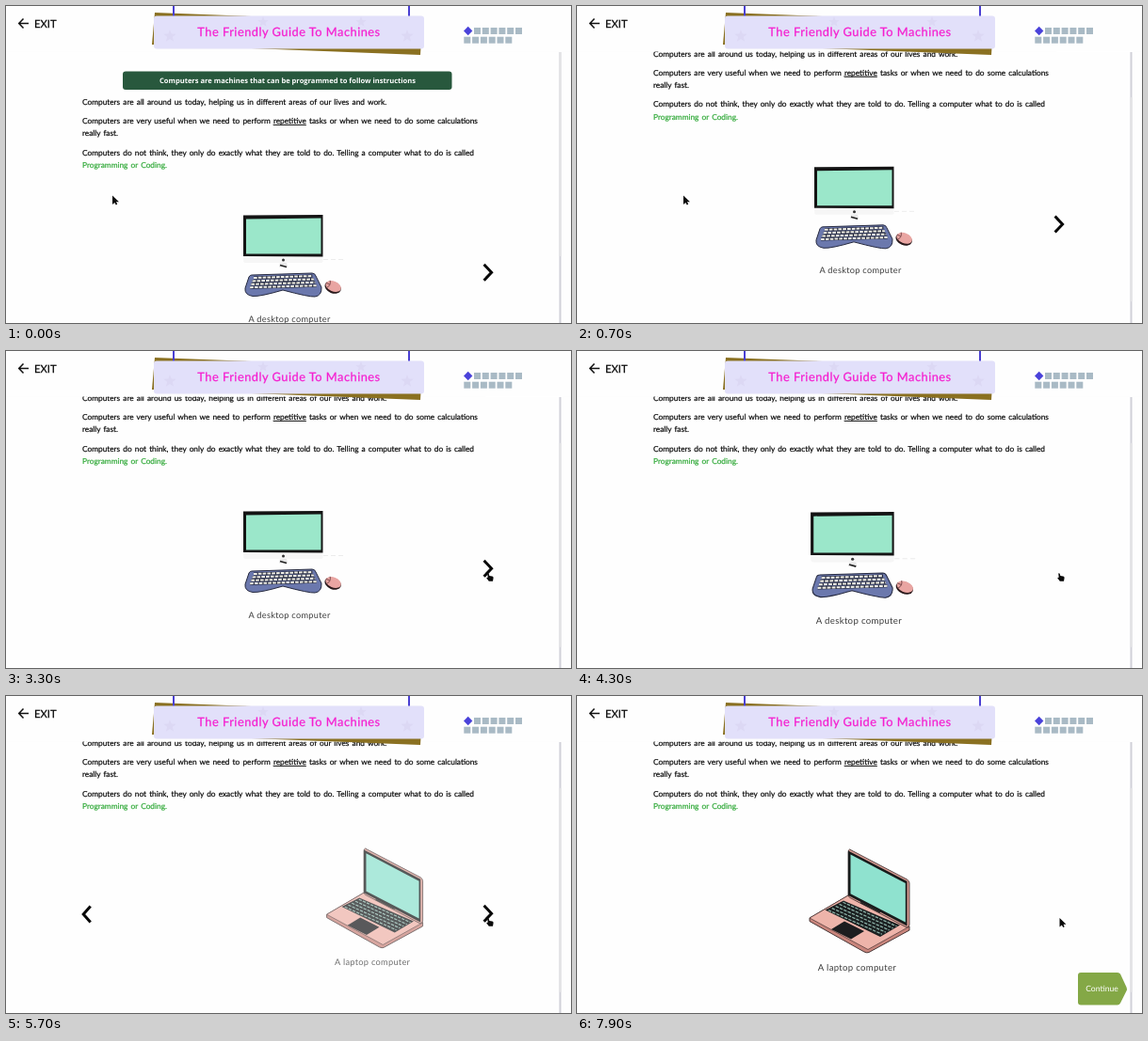
These frames come from a looping animation (600 px wide and 337 px high, 8000 ms). An HTML page:

```html
<!DOCTYPE html>
<html lang="en">
<head>
<meta charset="utf-8">
<title>Lesson slide</title>
<style>
  html, body { margin: 0; width: 100%; height: 100%; overflow: hidden; background: #fefefe; }
  svg { display: block; width: 100%; height: 100%; }
  text { font-family: Lato, "Open Sans", sans-serif; text-rendering: geometricPrecision; }
  .body { font-size: 8.3px; word-spacing: 1px; fill: #080808; stroke: #080808; stroke-width: .2; }
  .body .key { fill: #2ea836; stroke: #2ea836; }
  .caption { font-size: 9.2px; letter-spacing: .3px; fill: #3c3c3c; text-anchor: middle; }
  .chevron { fill: none; stroke: #080808; stroke-width: 3; }
</style>
</head>
<body>
<svg viewBox="0 0 600 337" preserveAspectRatio="none">
  <defs>
    <clipPath id="view"><rect x="81" y="100" width="436" height="300"/></clipPath>
  </defs>
  <rect width="600" height="337" fill="#fefefe"/>

  <g id="content">
    <rect x="124" y="69.5" width="349.5" height="19.5" rx="3" fill="#28583d"/>
    <text x="299" y="82" text-anchor="middle" fill="#fff" style="font:bold 7.55px 'Open Sans',sans-serif">Computers are machines that can be programmed to follow instructions</text>
    <g class="body">
      <text x="81" y="105">Computers are all around us today, helping us in different areas of our lives and work.</text>
      <text x="81" y="125">Computers are very useful when we need to perform <tspan text-decoration="underline">repetitive</tspan> tasks or when we need to do some calculations</text>
      <text x="81" y="138.3">really fast.</text>
      <text x="81" y="158.5">Computers do not think, they only do exactly what they are told to do. Telling a computer what to do is called</text>
      <text x="81" y="171.7" class="key">Programming or Coding.</text>
    </g>

    <g transform="translate(0 52)">
      <g clip-path="url(#view)">
        <g id="desktop">
          <path d="M252 214H336.5V219.5Q336 221 334 221H254.5Q252.5 221 252.3 219.5Z" fill="#f6f6f6"/>
          <path d="M252 170.5L336.5 170V214.5L252 214Z" fill="#141414"/>
          <path d="M255 174.5L334.5 173.5V211.5H255Z" fill="#9be7ca"/>
          <path d="M291 221H298L299 225.5H290Z" fill="#e8e8e8"/>
          <path d="M291 223.5L298 225.5" stroke="#222" stroke-width="1.5"/>
          <circle cx="294.5" cy="218" r="1.5" fill="#333"/>
          <path d="M337 217.5H361" stroke="#ececec" stroke-dasharray="5 3"/>
          <path d="M261 234Q293 233 325 232Q328 232 329 235L335 247Q335.5 256 328 257Q322 257.500 294 250Q270 257 262 256.5Q253 255 254 248L258 236Q259 234 261 234Z" fill="#6b78ad" stroke="#262a40" stroke-width="1"/>
          <g id="keys"></g>
          <g transform="rotate(22 347.5 246.3)">
            <ellipse cx="347.5" cy="247.3" rx="9" ry="6.1" fill="#29191b"/>
            <ellipse cx="347.5" cy="246" rx="8.6" ry="5.4" fill="#e9a5a2"/>
            <path d="M342 241.5Q345 246 341.5 250M339 245.5H343" fill="none" stroke="#6f3f42" stroke-width=".8"/>
          </g>
          <text class="caption" x="301" y="283.5">A desktop computer</text>
        </g>

        <g id="laptop">
          <path d="M247 236L288 212L353 245V249L310 272.5Q308 273.5 305 272L247 239.5Z" fill="#c9857c" stroke="#3a2b2b" stroke-width=".9" stroke-linejoin="round"/>
          <path d="M247 236L288 212L353 245L309 269.5Z" fill="#eeb4aa" stroke="#4a3434" stroke-width=".7" stroke-linejoin="round"/>
          <path d="M289.5 163Q288 163.500 288 166V211.5Q288 213.500 290 214.5L350 246Q353 246 353 243V199Q353 196.500 350.5 195Z" fill="#d79a91" stroke="#3a2b2b" stroke-width=".8"/>
          <path d="M288 164.5L350.5 197V244.5L288 212Z" fill="#171b1b"/>
          <path d="M290.5 168.5L348.8 199V240.5L290.5 210.2Z" fill="#8fe2cf"/>
          <path d="M283 217.5L343 243.5L322 256L263.5 227.5Z" fill="#1b2021"/>
          <g id="pads"></g>
          <path d="M284 239.5L305 250L291 258.5L270 248Z" fill="#1d1d1f"/>
          <path d="M301 219.5L322 230" stroke="#222" stroke-width="1.5"/>
          <text class="caption" x="297.5" y="292.2" style="font-size:9.6px">A laptop computer</text>
        </g>
      </g>
      <path id="prev" class="chevron" d="M89.700 223.500L82.200 232L89.700 240.500"/>
      <path id="next" class="chevron" d="M507.600 222.700L515.600 231.200L507.600 239.700"/>
    </g>
  </g>

  <rect width="600" height="48.5" fill="#fefefe"/>
  <rect x="587.5" y="49" width="2" height="288" fill="#d0d0d8"/>
  <rect id="thumb" x="587.5" width="2" height="217" fill="#e3e3e5"/>

  <path d="M24 18.5H14M18.5 13.5L13.7 18.5L18.5 23.5" fill="none" stroke="#111" stroke-width="1.5"/>
  <text x="30" y="23" font-size="11.3" fill="#0a0a0a" stroke="#0a0a0a" stroke-width=".25">EXIT</text>

  <path d="M158 7L442 18L440 52L155 41Z" fill="#8a7021"/>
  <path d="M178 0V11M428 0V11" stroke="#4a3fd2" stroke-width="2"/>
  <rect x="157" y="10.5" width="287" height="35" rx="3" fill="#e2e0fa"/>
  <g id="stars" fill="#dcd8f4"></g>
  <text x="300.5" y="31.5" text-anchor="middle" font-size="12.8" letter-spacing=".5" fill="#f51fd0" stroke="#f51fd0" stroke-width=".25">The Friendly Guide To Machines</text>

  <path d="M490.7 21.800L495.400 26.500L490.700 31.200L486 26.500Z" fill="#4a42da"/>
  <g id="steps" fill="#a9bac5"></g>

  <g id="continue">
    <path d="M535 294H574Q576 294 577 295.5L583.5 309.5Q584.5 311.5 583.5 313.5L577 326.5Q576 328.500 574 328.5H535Q532 328.500 532 325.5V297Q532 294 535 294Z" fill="#84a846"/>
    <text x="557.5" y="313.5" text-anchor="middle" font-size="8.6" fill="#fff">Continue</text>
  </g>

  <path id="arrow" d="M0 0V9.5L2.300 7.500L3.800 10L5.200 9.300L4 6.800H7Z" fill="#0a0a0a"/>
  <path id="hand" d="M-1.300 .5Q-.2 -.2 .3 1L.8 3L3.800 3.500Q5.200 3.800 5.100 5.200L4.500 8.700H.3L-2.200 5.500Q-2.300 4.400 -.8 4.700Z" fill="#0a0a0a"/>
</svg>
<script>
const LOOP = 8000, TICK = 200;
const el = id => document.getElementById(id);

function add(parent, tag, attrs) {
  const node = document.createElementNS("http://www.w3.org/2000/svg", tag);
  for (const key in attrs) node.setAttribute(key, attrs[key]);
  el(parent).appendChild(node);
}

function dashes(parent, d, color, width, dash) {
  add(parent, "path", { d, stroke: color, "stroke-width": width, "stroke-dasharray": dash });
}

function star(cx, cy, r) {
  const points = Array.from({ length: 10 }, (_, i) => {
    const a = i * Math.PI / 5, d = i % 2 ? r * .42 : r;
    return [cx + d * Math.sin(a), cy - d * Math.cos(a)];
  });
  add("stars", "polygon", { points: points.join(" ") });
}
for (const side of [-1, 1]) {
  star(300 + side * 126, 32, 7);
  star(325 + side * 52, 17, 6);
}

for (let i = 0; i < 6; i++) {
  add("steps", "rect", { x: 497 + i * 8.8, y: 23, width: 7, height: 7 });
  add("steps", "rect", { x: 486.3 + i * 8.8, y: 32.7, width: 7, height: 7 });
}
for (let i = 0; i < 4; i++) {
  const row = `M${263 - i * 1.3} ${237 + i * 3.4}L${325.5 + i * 1.4} ${235 + i * 3.4}`;
  dashes("keys", row, "#1c2033", 3, "none");
  dashes("keys", row, "#efeee6", 2, "3.7 1.1");
}
for (let i = 0; i < 5; i++) {
  const x = 282.5 - i * 3.9, y = 219.3 + i * 2.1;
  dashes("pads", `M${x} ${y}l57 25.5`, "#8fb5ab", 1.2, "3.4 1.3");
}

const ramp = (t, from, to) => Math.min(1, Math.max(0, (t - from) / (to - from)));
const smooth = u => u * u * (3 - 2 * u);
const show = (id, alpha) => el(id).setAttribute("opacity", +alpha);
const move = (id, x, y, s = 1) =>
  el(id).setAttribute("transform", `translate(${x} ${y}) scale(${s})`);

function drawScroll(t) {
  const top = 52 * (1 - 2 ** (-3 * Math.max(0, t - 300) / TICK));
  move("content", 0, -top);
  el("thumb").setAttribute("y", 49 + top * .94);
}

function drawSlides(t) {
  const zoomed = t >= 4300;
  const out = Math.max(0, t - 4900) / TICK;
  move("desktop", zoomed ? -16 - 76 * out : 0, zoomed ? -7.2 : 0, zoomed ? 1.048 : 1);
  show("desktop", t < 5500 && 1 - .14 * out ** 1.5);

  const left = Math.max(0, 5900 - t) / TICK;
  if (t < 7900) move("laptop", 13 + 90 * left, 5.2, .962);
  else move("laptop", 0, 0);
  show("laptop", t >= 5500 && 1 - .27 * left);

  const both = t >= 5700 && t < 6300;
  show("prev", both);
  show("next", !zoomed || both);
  show("continue", t >= 6100);
}

function drawPointer(t) {
  const e = smooth(ramp(t, 1100, 2900) ** .82);
  const x = 113 + 399.5 * e;
  const y = 201.5 + 40 * smooth(e) - 5.5 * ramp(t, 2900, 3300);
  const onImage = x > 136 && x < 464, onNext = x > 505 && t < 6300;
  move("arrow", x, y);
  move("hand", x, y);
  show("hand", onImage || onNext);
  show("arrow", !(onImage || onNext));
}

// The picture advances in ticks that fall on odd hundreds of milliseconds
function draw(time) {
  const half = TICK / 2;
  const t = Math.floor((time + half) / TICK) * TICK - half;
  drawScroll(t);
  drawSlides(t);
  drawPointer(t);
}

const start = performance.now();
function frame() {
  draw((performance.now() - start) % LOOP);
  requestAnimationFrame(frame);
}
draw(0);
requestAnimationFrame(frame);
</script>
</body>
</html>
```
